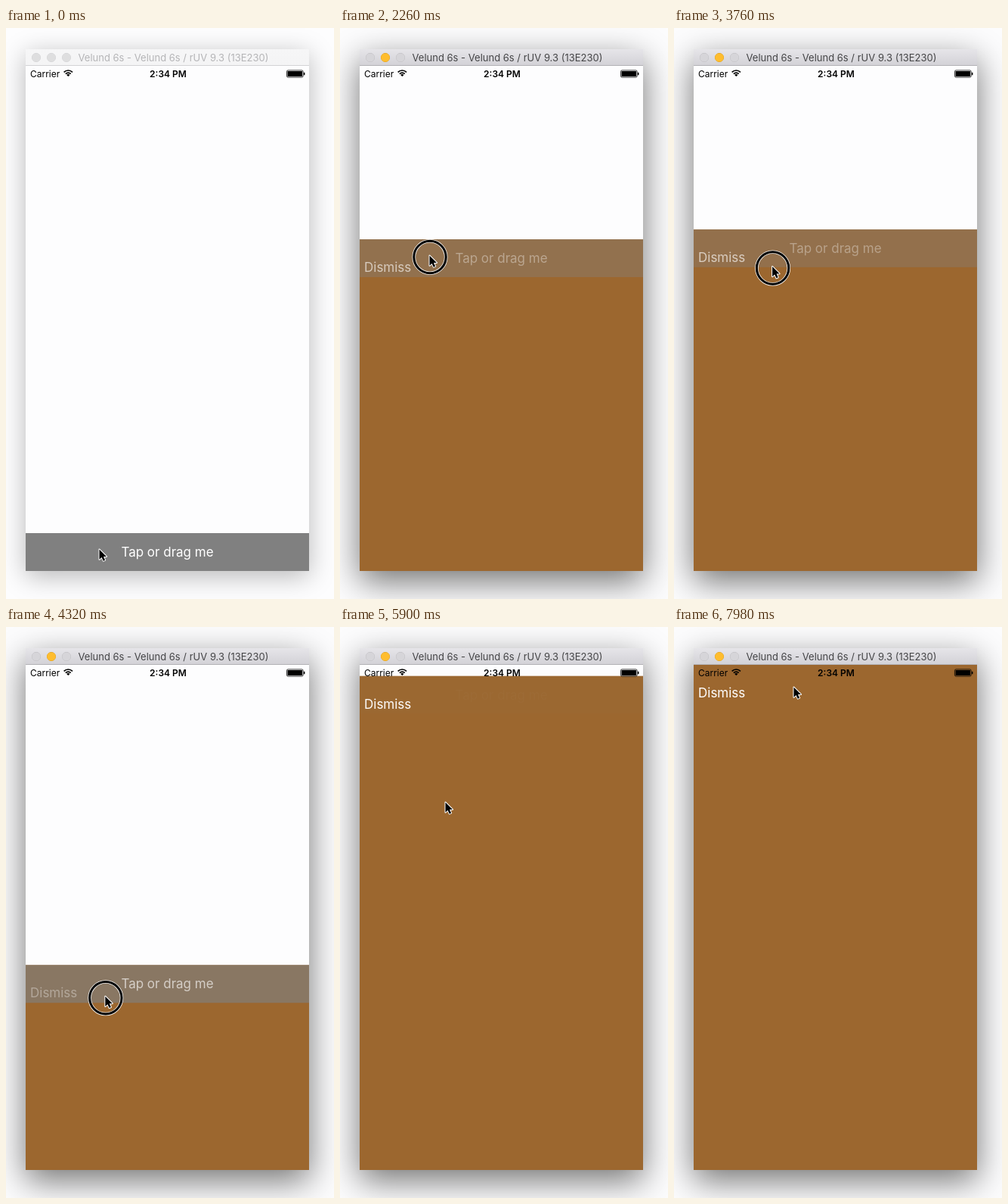
Write an HTML page with a canvas that moves like this. It is 434 by 754 pixels and loops after 8000 ms.

```html
<!DOCTYPE html>
<html lang="en">
<head>
<meta charset="utf-8">
<title>Draggable sheet</title>
<style>
  html, body { margin: 0; width: 100%; height: 100%; overflow: hidden; background: #fdfdfe; }
  canvas { display: block; width: 434px; height: 754px; }
</style>
</head>
<body>
<canvas id="stage" width="434" height="754"></canvas>
<script>
const ctx = document.getElementById('stage').getContext('2d');
const LOOP = 8000;
const PAPER = '#fdfdfe';
const LEFT = 26, TOP = 28, WIDTH = 375, SCREEN_TOP = 50, SCREEN_H = 667;
const CENTER = LEFT + WIDTH / 2;
const REST_Y = 667, BAR_H = 50;
const ACTIVATE = 400, PRESS = 1200, RELEASE = 5600;
const LAG = 90, SETTLE = 520;

// Hand movements: each eases from wherever the previous one ended
const START = { x: 123, y: 688 };
const strokes = [
  { from: 1294, to: 1882, x: 118, y: 300 },
  { from: 2600, to: 3180, x: 129, y: 227 },
  { from: 3285, to: 4553, x: 131, y: 510 },
  { from: 4857, to: 5714, x: 123, y: 230 },
  { from: 5714, to: 5880, x: 139, y: 231 },
  { from: 6300, to: 7500, x: 158, y: 79 }
];

const clamp = v => Math.min(1, Math.max(0, v));
const easeInOut = u => (1 - Math.cos(Math.PI * u)) / 2;
const easeOut = u => 1 - (1 - u) ** 3;

function pointerAt(t) {
  return strokes.reduce((p, s) => {
    const e = easeInOut(clamp((t - s.from) / (s.to - s.from)));
    return { x: p.x + (s.x - p.x) * e, y: p.y + (s.y - p.y) * e };
  }, START);
}

// The sheet trails the hand, then settles under the title bar once released
function sheetAt(t) {
  const dragged = REST_Y + pointerAt(Math.min(t, RELEASE) - LAG).y - START.y;
  return dragged + (SCREEN_TOP - dragged) * easeOut(clamp((t - RELEASE) / SETTLE));
}

function text(str, x, y, size, color, weight = 400, align = 'left') {
  ctx.font = `${weight} ${size}px Inter, Roboto, sans-serif`;
  ctx.textAlign = align;
  ctx.fillStyle = color;
  ctx.fillText(str, x, y);
}

function rect(x, y, w, h, color) {
  ctx.fillStyle = color;
  ctx.fillRect(x, y, w, h);
}

function arc(x, y, r, stroke, width, from = 0, to = 2 * Math.PI) {
  ctx.beginPath();
  ctx.arc(x, y, r, from, to);
  ctx.strokeStyle = stroke;
  ctx.lineWidth = width;
  ctx.stroke();
}

function drawWindow(active) {
  ctx.save();
  ctx.shadowColor = active ? 'rgba(0,0,0,.55)' : 'rgba(0,0,0,.28)';
  ctx.shadowBlur = active ? 42 : 32;
  ctx.shadowOffsetY = active ? 14 : 7;
  rect(LEFT, TOP, WIDTH, SCREEN_H + 22, PAPER);
  ctx.restore();

  const shade = ctx.createLinearGradient(0, TOP, 0, SCREEN_TOP);
  shade.addColorStop(0, active ? '#e6e5e9' : '#f6f6f7');
  shade.addColorStop(1, active ? '#d2d1d6' : '#f4f4f5');
  rect(LEFT, TOP, WIDTH, 22, shade);
  rect(LEFT, SCREEN_TOP - 1, WIDTH, 1, active ? '#b3b2b6' : '#d3d3d5');

  for (const x of [40, 60, 80]) {
    const lit = active && x === 60;
    arc(x, 39, 5.6, lit ? '#dfa023' : active ? '#c1c0c4' : '#d4d4d6', 1);
    ctx.fillStyle = lit ? '#ffbd2e' : active ? '#d6d5d9' : '#dededf';
    ctx.fill();
  }
  text('Velund 6s - Velund 6s / rUV 9.3 (13E230)', 221.5, 44, 13, active ? '#454547' : '#b5b5b7', 400, 'center');
  rect(LEFT, SCREEN_TOP, WIDTH, SCREEN_H, PAPER);
}

// Bar and sheet cross-fade as the sheet rises
function drawSheet(y) {
  const risen = clamp((REST_Y - y) / (REST_Y - SCREEN_TOP));
  ctx.save();
  ctx.beginPath();
  ctx.rect(LEFT, SCREEN_TOP, WIDTH, SCREEN_H);
  ctx.clip();
  rect(LEFT, y, WIDTH, SCREEN_H, '#9c672f');
  rect(LEFT, y, WIDTH, BAR_H, `rgba(128,128,128,${1 - risen})`);
  text('Dismiss', 32, y + 43, 17, `rgba(255,255,255,${risen})`);
  text('Tap or drag me', CENTER, y + 31, 17, `rgba(255,255,255,${1 - risen})`, 400, 'center');
  ctx.restore();
}

function drawStatus() {
  text('Carrier', 32, 64.5, 12, '#000');
  text('2:34 PM', 214.5, 64.5, 12, '#000', 600, 'center');
  for (const r of [1.5, 4.8, 8]) {
    arc(82.3, 64, r, '#000', r < 2 ? 3 : 1.7, -Math.PI * .75, -Math.PI * .25);
  }
  ctx.lineWidth = .8;
  ctx.beginPath();
  ctx.roundRect(371.4, 55.9, 21.8, 9.2, 1.8);
  ctx.stroke();
  rect(372.5, 57, 19.6, 7, '#000');
  rect(394, 58.8, 1.4, 3.4, '#000');
}

function drawPointer({ x, y }, pressed) {
  if (pressed) {
    arc(x + 1, y + 2.5, 21.2, 'rgba(255,255,255,.9)', 4.6);
    arc(x + 1, y + 2.5, 21.2, '#000', 3);
  }
  const arrow = new Path2D('M0 0V13.2L3.1 10.4 5.3 15.2 7.6 14.2 5.5 9.5H9.5Z');
  ctx.save();
  ctx.translate(x + .5, y + .5);
  ctx.lineJoin = 'round';
  ctx.lineWidth = 2;
  ctx.strokeStyle = '#fff';
  ctx.stroke(arrow);
  ctx.fillStyle = '#000';
  ctx.fill(arrow);
  ctx.restore();
}

function draw(now) {
  const t = now % LOOP;
  rect(0, 0, 434, 754, PAPER);
  drawWindow(t >= ACTIVATE);
  drawSheet(sheetAt(t));
  drawStatus();
  drawPointer(pointerAt(t), t >= PRESS && t < RELEASE);
  requestAnimationFrame(draw);
}
requestAnimationFrame(draw);
</script>
</body>
</html>
```
